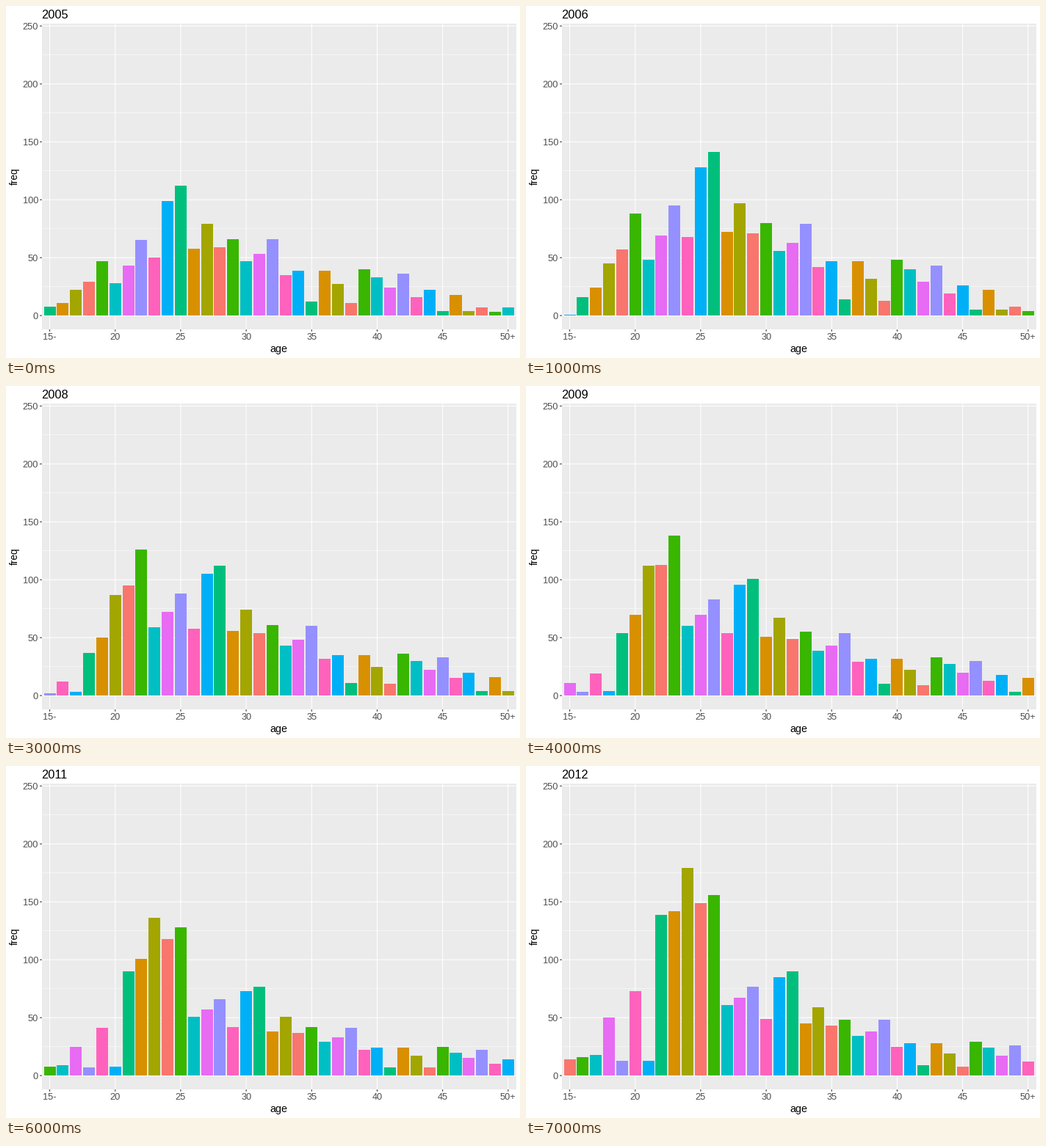
A matplotlib script for the animation above (8000 ms loop, 700 by 480 pixels).

```python
import math

import matplotlib.pyplot as plt
import numpy as np
from matplotlib.animation import FuncAnimation
from matplotlib.patches import Rectangle

W, H, DPI = 700, 480, 100
PT = 72 / DPI  # points per pixel
LEFT, RIGHT, TOP, BOTTOM = 48.85, 694.53, 24.1, 441.1
FIRST_AGE, N_AGES = 15, 36
FIRST_YEAR, N_YEARS = 2005, 8
UNIT = (RIGHT - LEFT) / (N_AGES + 0.2)
Y_LOW, Y_HIGH = -12, 252

HUES = ["#00BF7D", "#D89000", "#A3A500", "#F8766D", "#39B600",
        "#00BFC4", "#E76BF3", "#9590FF", "#FF62BC", "#00B0F6"]

# Full-grown size of each birth cohort, youngest first
COHORTS = [800, 510, 340, 550, 90, 320, 40,
           320, 270, 300, 230, 230, 88, 95, 108, 68, 119,
           125, 62, 82, 60, 67, 47, 53, 66, 35, 39,
           12, 39, 27, 11, 40, 33, 24, 36, 16, 22,
           4, 18, 4, 7, 3, 7]


def trend(step):
    """Overall level of the counts in each year."""
    return np.interp(step, [0, 1, 2, 4, 6, 7], [1, 1.2, 1, 0.82, 0.62, 0.72])


def maturity(age):
    """Share of a cohort that has joined by this age."""
    return 1 / (1 + math.exp((21.3 - age) / 1.7))


def count(step, i):
    size = COHORTS[i - step + N_YEARS - 1]
    return round(size * maturity(FIRST_AGE + i) * trend(step))


def x_at(age):
    return LEFT + (age - FIRST_AGE + 0.6) * UNIT


def y_at(value):
    return BOTTOM - (value - Y_LOW) * (BOTTOM - TOP) / (Y_HIGH - Y_LOW)


fig = plt.figure(figsize=(W / DPI, H / DPI), dpi=DPI, facecolor="white")
ax = fig.add_axes([0, 0, 1, 1])
ax.set_xlim(0, W)
ax.set_ylim(H, 0)
ax.axis("off")


def line(xs, ys, color="white", width=1.07):
    ax.plot(xs, ys, color=color, lw=width * PT, zorder=1,
            solid_capstyle="butt", snap=False)


def label(x, y, text, size, color="black", ha="center", **kw):
    return ax.text(x, y, text, fontsize=size * PT, color=color, ha=ha,
                   va="baseline", family="Liberation Sans", **kw)


def box(x, y, w, h, color, z):
    return ax.add_patch(Rectangle((x, y), w, h, fc=color, lw=0, zorder=z,
                                  antialiased=False))


box(LEFT, TOP, RIGHT - LEFT, BOTTOM - TOP, "#EBEBEB", 0)

for value in range(25, 250, 50):
    line([LEFT, RIGHT], [y_at(value)] * 2, width=0.53)

for value in range(0, 251, 50):
    y = y_at(value)
    line([LEFT, RIGHT], [y, y])
    line([LEFT - 2.75, LEFT], [y, y], "#333333")
    label(44, y + 4.7, str(value), 12.7, "#4D4D4D", ha="right")

for age in range(15, 51, 5):
    x = x_at(age)
    line([x, x], [TOP, BOTTOM])
    line([x, x], [BOTTOM, BOTTOM + 2.75], "#333333")
    suffix = {15: "-", 50: "+"}.get(age, "")
    label(x, 455, f"{age}{suffix}", 12.8, "#4D4D4D")

label((LEFT + RIGHT) / 2 - 0.3, 472, "age", 14.2)
label(15.5, (TOP + BOTTOM) / 2 - 0.6, "freq", 13.5, rotation=90,
      rotation_mode="anchor")
title = label(48, 17, "", 16.4, ha="left")

bars = [box(x_at(FIRST_AGE + i) - 0.45 * UNIT, y_at(0), 0.9 * UNIT, 0,
            "white", 2) for i in range(N_AGES)]


def draw(step):
    title.set_text(str(FIRST_YEAR + step))
    for i, bar in enumerate(bars):
        bar.set_height(y_at(count(step, i)) - y_at(0))
        bar.set_facecolor(HUES[(i - step) % len(HUES)])
    return [title, *bars]


anim = FuncAnimation(fig, draw, frames=N_YEARS, interval=1000,
                     repeat=True, repeat_delay=0, blit=False)
plt.show()
```
